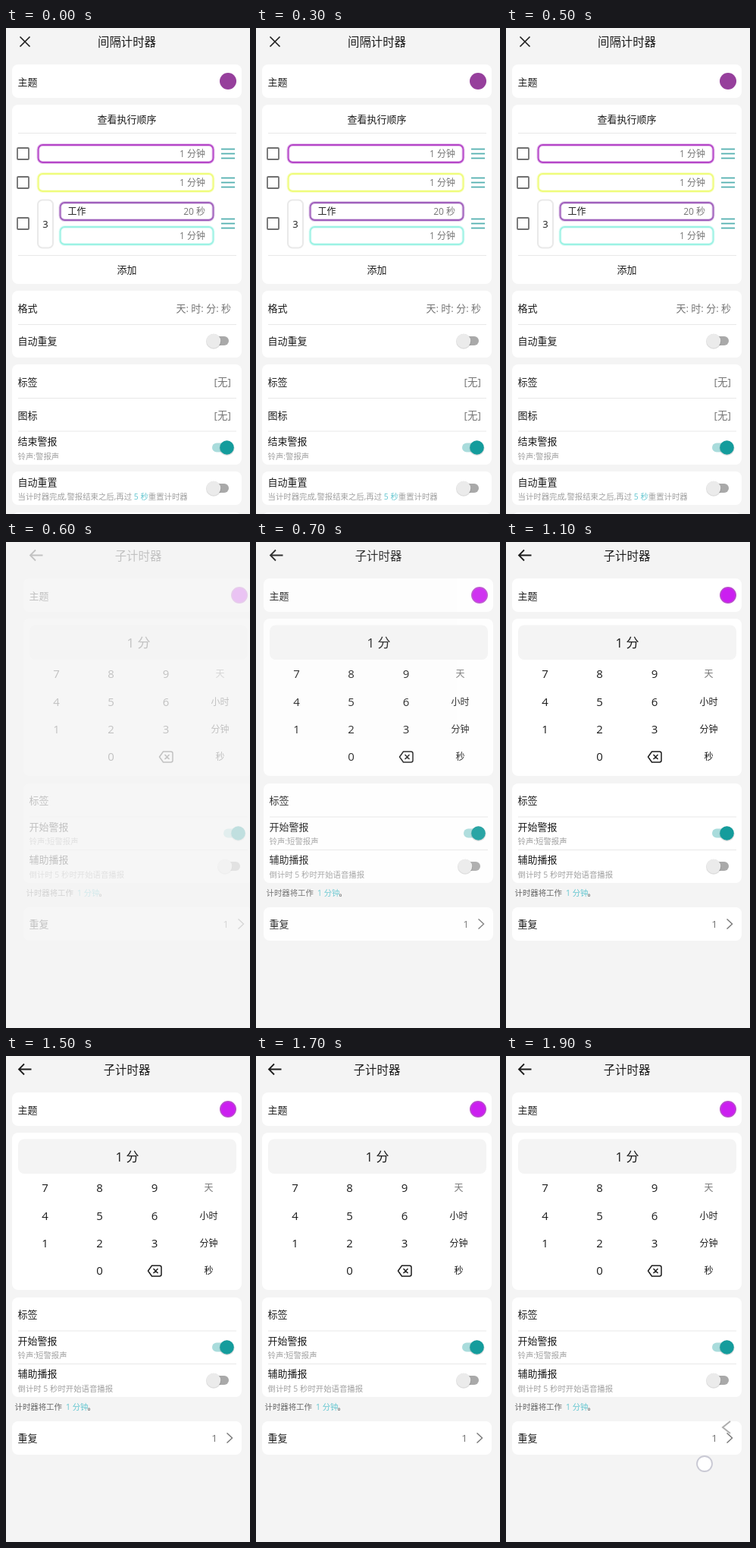
Animation, 322 px wide and 640 px high, one loop 2 s. Source, as an HTML page:

```html
<!DOCTYPE html>
<html lang="zh-CN">
<head>
<meta charset="utf-8">
<style>
html, body { margin: 0; width: 100%; height: 100%; overflow: hidden; background: #f4f4f4; }
svg { display: block; width: 322px; height: 640px; }
text { font-family: "Open Sans", "Noto Sans CJK SC", "Noto Sans CJK", sans-serif; white-space: pre; }
</style>
</head>
<body>
<svg id="stage" viewBox="0 0 322 640"></svg>
<script>
const INK = '#1c1c1c', GREY = '#757575', PALE = '#a0a0a0', TEAL = '#149c9c', AQUA = '#63c6d0';
const LOOP = 2000;

// Text is placed by its vertical centre.
const label = (x, cy, text, size = 13, fill = INK, anchor = 'start') =>
  `<text x="${x}" y="${cy + size * 0.35}" font-size="${size}" fill="${fill}" text-anchor="${anchor}">${text}</text>`;
const middle = (x, cy, text, size, fill) => label(x, cy, text, size, fill, 'middle');
const right = (x, cy, text, size, fill = GREY) => label(x, cy, text, size, fill, 'end');

const box = (x, y, x2, y2, r, fill, stroke = 'none', width = 0) =>
  `<rect x="${x}" y="${y}" width="${x2 - x}" height="${y2 - y}" rx="${r}" fill="${fill}" stroke="${stroke}" stroke-width="${width}"/>`;
const card = (top, bottom) => box(8, top, 311, bottom, 8, '#fff');
const path = (d, stroke = INK, width = 1.6, extra = '') =>
  `<path d="${d}" fill="none" stroke="${stroke}" stroke-width="${width}" ${extra}/>`;
const rule = y => path(`M16 ${y}H304`, '#e8e8e8', 1);
const dot = (x, y, r, fill, stroke = 'none', width = 0) =>
  `<circle cx="${x}" cy="${y}" r="${r}" fill="${fill}" stroke="${stroke}" stroke-width="${width}"/>`;

const toggle = (cy, on) => {
  const knob = on ? 291.5 : 274;
  const track = on ? box(272, cy - 6, 298, cy + 6, 6, '#a9dcdc') : box(268, cy - 6, 294, cy + 6, 6, '#a9a9a9');
  return track + dot(knob, cy + 0.7, 10, '#0002') + dot(knob, cy, 9.3, on ? TEAL : '#ebebeb');
};
const checkbox = cy => box(15, cy - 7.5, 30, cy + 7.5, 1, '#fff', '#707070', 1.8);
const handle = cy => [-6, 0, 6].map(d => path(`M284 ${cy + d}H302`, '#55b0b0', 1.8)).join('');
// A wide, faint stroke under the main one softens the outline.
const interval = (x, cy, color, time) => [
  box(x, cy - 11.5, 273.5, cy + 11.5, 6, '#fff', color + '50', 4),
  box(x, cy - 11.5, 273.5, cy + 11.5, 6, 'none', color, 1.8),
  right(263, cy, time, 12)
].join('');

const listPage = () => [
  path('M18.5 11.5L31.5 24.5M31.5 11.5L18.5 24.5'),
  middle(159.5, 18.5, '间隔计时器', 15.4),
  card(48, 92), label(15.5, 71, '主题'), dot(293, 70, 11, '#963f9c'),

  card(101, 337), middle(159.5, 120.5, '查看执行顺序'), rule(138.5),
  checkbox(165.5), interval(42.5, 165.5, '#b546c8', '1 分钟'), handle(165.5),
  checkbox(203.5), interval(42.5, 203.5, '#effc7c', '1 分钟'), handle(203.5),
  checkbox(257.5), handle(257.5),
  box(42, 226.5, 62, 289.5, 6, '#fff', '#e9e9e9', 2), middle(52, 258, '3', 13),
  interval(71.5, 241.5, '#a060bc', '20 秒'), label(81.5, 241.5, '工作', 12),
  interval(71.5, 273.5, '#9cf2e4', '1 分钟'),
  rule(299.5), middle(159.5, 318.5, '添加'),

  card(346, 434), label(15.5, 369, '格式'), right(297, 369, '天: 时: 分: 秒'), rule(390.5),
  label(15.5, 412.5, '自动重复'), toggle(412, false),

  card(443, 575), label(15.5, 466, '标签'), right(297, 466, '[无]', 13.5), rule(487.5),
  label(15.5, 510, '图标'), right(297, 510, '[无]', 13.5), rule(531),
  label(15.5, 544, '结束警报'), label(15.5, 564, '铃声:警报声', 10.4, PALE), toggle(552.5, true),

  card(584, 628), label(15.5, 598, '自动重置'), toggle(606, false),
  label(15.5, 617.5, `当计时器完成,警报结束之后,再过 <tspan fill="${AQUA}">5 秒</tspan>重置计时器`, 10.4, PALE),
  card(638, 660)
].join('');

const keypad = () => {
  const columns = [51.5, 123.5, 196, 267.5], rows = [174, 210.5, 247, 283];
  const keys = [['7', '8', '9', '天'], ['4', '5', '6', '小时'], ['1', '2', '3', '分钟'], ['', '0', '', '秒']];
  return keys.flatMap((row, r) => row.map((key, c) =>
    key && middle(columns[c], rows[r], key, c < 3 ? 15 : 12, key === '天' ? GREY : INK))).join('');
};

const editPage = () => [
  path('M33.5 17.5H17M24 10.5L17 17.5L24 24.5', INK, 1.8),
  middle(159.5, 18.5, '子计时器', 15.4),
  card(48, 92), label(15.5, 71, '主题'), dot(293, 70, 10.3, '#cb1ff0', '#b84fcb', 1.4),

  card(101, 308), box(16, 109.5, 304, 155, 8, '#f4f4f4'), middle(160, 133, '1 分', 17), keypad(),
  path('M192.5 276H202.5Q205 276 205 278.5V287.5Q205 290 202.5 290H192.5L187.5 283ZM194.5 280L200.5 286M200.5 280L194.5 286',
    INK, 1.5, 'stroke-linejoin="round"'),

  card(318, 449), label(15.5, 340.5, '标签'), rule(362),
  label(15.5, 375, '开始警报'), label(15.5, 394.5, '铃声:短警报声', 10.4, PALE), toggle(383.5, true), rule(405.5),
  label(15.5, 418.5, '辅助播报'), label(15.5, 438.5, '倒计时 5 秒时开始语音播报', 10.4, PALE), toggle(427, false),
  label(11.5, 462, '计时器将工作', 10.4, '#666'), label(79, 462, '1 分钟', 10.4, AQUA), label(107.5, 462, '。', 10.4, '#333'),

  card(481, 525), label(15.5, 503.5, '重复'), middle(275, 503.5, '1', 13.5, GREY),
  path('M291.5 496.5L298.5 503L291.5 509.5', '#777', 1.4)
].join('');

const layer = (id, content) => `<g id="${id}">${content}</g>`;
stage.innerHTML =
  layer('list', listPage()) +
  layer('edit', editPage()) +
  layer('back', path('M296 481L286 489L296 497', '#adadad', 2)) +
  layer('touch', dot(262, 537, 10, '#fff', '#c9c9d4', 1.8));

// Each step is [time in ms, opacity, horizontal shift]; poses hold until the next step.
function play(id, steps) {
  const pose = ([time, opacity, shift = 0]) =>
    ({ offset: time / LOOP, opacity, transform: `translateX(${shift}px)`, easing: 'step-end' });
  const frames = steps.map(pose);
  frames.push({ ...frames[frames.length - 1], offset: 1 });
  document.getElementById(id).animate(frames, { duration: LOOP, iterations: Infinity });
}

play('list', [[0, 1], [600, 0]]);
play('edit', [[0, 0], [600, 0.23, 15], [700, 0.9, 2], [800, 1]]);
play('back', [[0, 0], [1900, 1]]);
play('touch', [[0, 0], [1800, 1, 30], [1900, 1]]);
</script>
</body>
</html>
```
